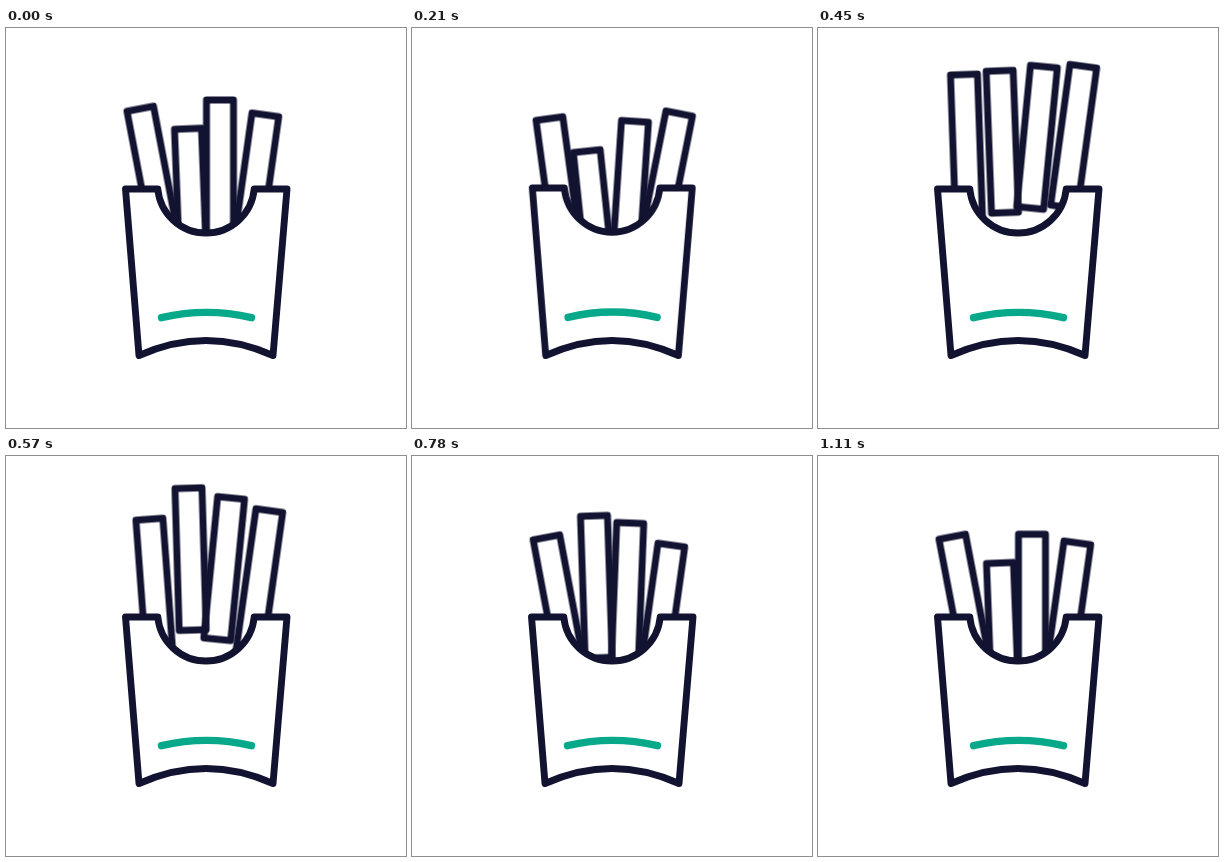
These frames come from a looping animation (400x400 px, 4410 ms). An HTML page without scripts:

```html
<!DOCTYPE html>
<html lang="en">
<head>
<meta charset="utf-8">
<title>Fries</title>
<style>
  html, body { margin: 0; width: 100%; height: 100%; overflow: hidden; background: #fff; }
  svg { display: block; width: 100vw; height: 100vh; }
  .ink { fill: none; stroke: #121331; stroke-width: 6.9; stroke-linecap: round; stroke-linejoin: round; }
  .fry, .box { animation: 4410ms linear infinite both; }
  .fry { transform-origin: 0 0; }
  .box { transform-origin: 200px 329px; animation-name: squash; }
  .a { animation-name: a; }
  .b { animation-name: b; }
  .c { animation-name: c; }
  .d { animation-name: d; }

  @keyframes squash {
    0% { transform: none; animation-timing-function: ease-in-out; }
    2.381% { transform: scale(1.095, .91); animation-timing-function: ease-in-out; }
    4.762% { transform: scale(.99, 1.006); animation-timing-function: ease-out; }
    6.122%, 100% { transform: none; }
  }
  @keyframes a {
    0% { transform: translate(121px, 83.3px) rotate(-10.8deg); animation-timing-function: ease-in-out; }
    2.721% { transform: translate(120px, 103px) rotate(-10.5deg); animation-timing-function: ease-in; }
    4.762% { transform: translate(124px, 92.7px) rotate(-7.8deg); }
    7.483% { transform: translate(131.5px, 58px) rotate(-2.6deg); animation-timing-function: ease-out; }
    10.204% { transform: translate(132.5px, 47px) rotate(-2deg); animation-timing-function: ease-in; }
    12.925% { transform: translate(130px, 64px) rotate(-4.2deg); }
    15.646% { transform: translate(122.5px, 88px) rotate(-9.8deg); animation-timing-function: ease-in-out; }
    18.367%, 100% { transform: translate(121px, 83.3px) rotate(-10.8deg); }
  }
  @keyframes b {
    0% { transform: translate(168.5px, 101.3px) rotate(-2.2deg); animation-timing-function: ease-in-out; }
    3.401% { transform: translate(162px, 132px) rotate(-6deg); animation-timing-function: ease-in; }
    4.762% { transform: translate(161.3px, 125px) rotate(-6deg); }
    7.483% { transform: translate(166.3px, 67px) rotate(-3.2deg); animation-timing-function: ease-out; }
    12.925% { transform: translate(169px, 32.6px) rotate(-1.7deg); animation-timing-function: ease-out; }
    13.605% { transform: translate(169px, 32px) rotate(-1.6deg); animation-timing-function: ease-in; }
    15.646% { transform: translate(168.5px, 36.2px) rotate(-1.7deg); animation-timing-function: cubic-bezier(.4, .2, .7, .8); }
    20.408% { transform: translate(168.5px, 100.5px) rotate(-2.2deg); animation-timing-function: ease-out; }
    22.449% { transform: translate(168.5px, 112px) rotate(-2.2deg); animation-timing-function: ease-in-out; }
    25.17%, 100% { transform: translate(168.5px, 107.5px) rotate(-2.2deg); }
  }
  @keyframes c {
    0% { transform: translate(200.5px, 72px); animation-timing-function: ease-in-out; }
    3.401% { transform: translate(207px, 101px) rotate(3deg); animation-timing-function: ease-in; }
    4.762% { transform: translate(209.5px, 92.8px) rotate(3.8deg); }
    7.483% { transform: translate(212px, 50.5px) rotate(4.8deg); animation-timing-function: ease-out; }
    10.884% { transform: translate(212.5px, 36.5px) rotate(5.6deg); animation-timing-function: ease-in; }
    12.925% { transform: translate(211.7px, 40.5px) rotate(5.6deg); }
    15.646% { transform: translate(208px, 54.3px) rotate(3.9deg); }
    20.408% { transform: translate(200.5px, 82.5px); animation-timing-function: ease-in-out; }
    24.49%, 100% { transform: translate(200.5px, 78.2px); }
  }
  @keyframes d {
    0% { transform: translate(246px, 85px) rotate(8deg); animation-timing-function: ease-in-out; }
    2.721% { transform: translate(252px, 99px) rotate(11deg); animation-timing-function: ease-in; }
    4.762% { transform: translate(254px, 83.3px) rotate(11.3deg); }
    7.483% { transform: translate(251px, 45px) rotate(8.2deg); animation-timing-function: ease-out; }
    9.864% { transform: translate(252px, 36px) rotate(7.8deg); animation-timing-function: ease-in; }
    12.925% { transform: translate(250px, 52.5px) rotate(8deg); }
    15.646% { transform: translate(246.5px, 82.3px) rotate(8deg); animation-timing-function: ease-out; }
    17.007% { transform: translate(246px, 88px) rotate(8deg); animation-timing-function: ease-in-out; }
    19.048%, 100% { transform: translate(246px, 85px) rotate(8deg); }
  }
</style>
</head>
<body>
<svg viewBox="0 0 400 400">
  <g class="ink">
    <rect class="fry a" width="27" height="142"/>
    <rect class="fry b" width="27" height="142"/>
    <rect class="fry c" width="27" height="142"/>
    <rect class="fry d" width="27" height="142"/>
  </g>
  <g class="ink box">
    <path fill="#fff" d="M119.5 161H151.8A48.4 48.4 0 0 0 248.2 161H281L267 327.5Q200 297.5 133 327.5Z"/>
    <path stroke="#08a88a" stroke-width="7.4" d="M155.5 289.7Q200.5 279 245.5 289.7"/>
  </g>
</svg>
</body>
</html>
```
